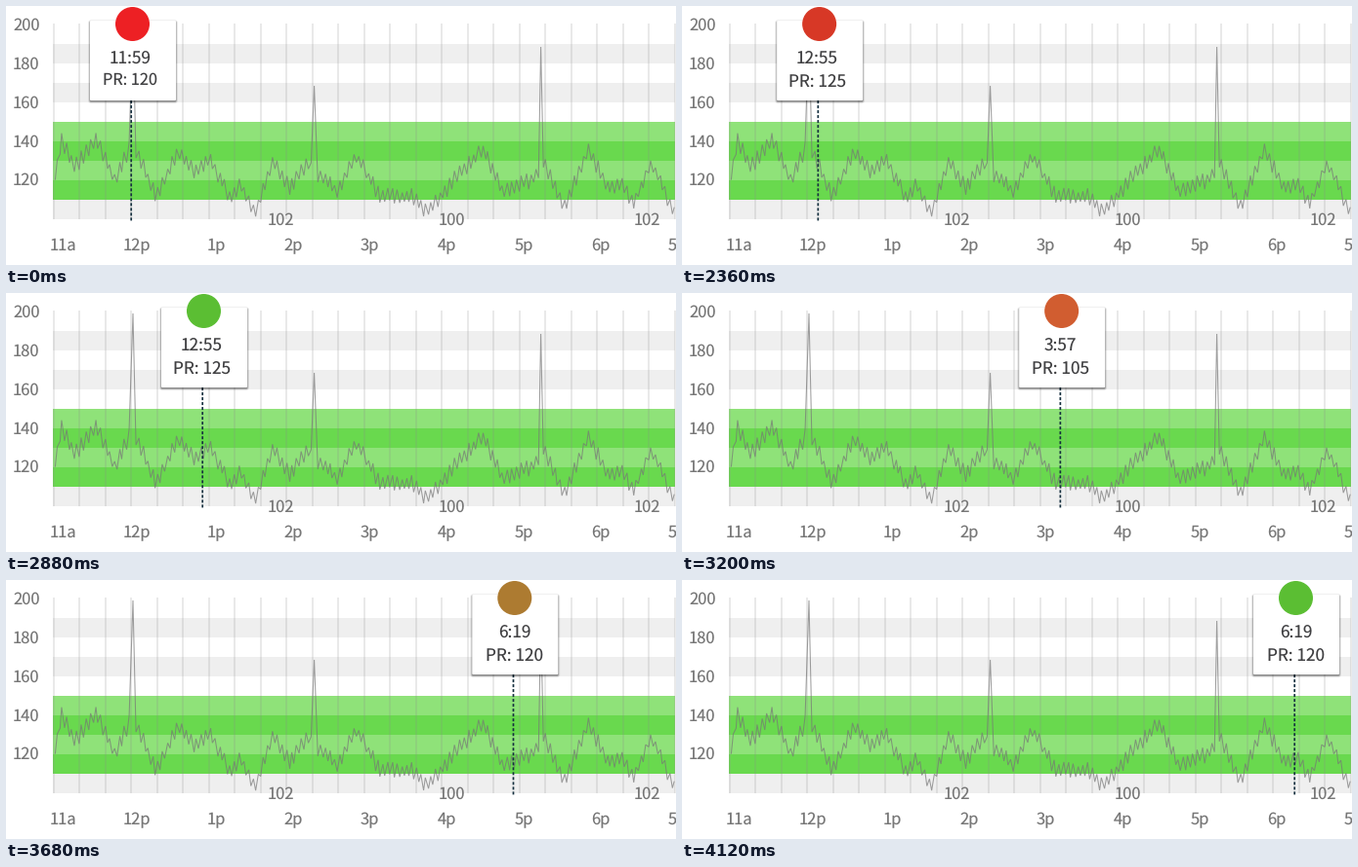
Animation of 686 by 266 pixels, one loop 5600 ms. Source, as a matplotlib script:

```python
import numpy as np
import matplotlib.pyplot as plt
from matplotlib.animation import FuncAnimation
from matplotlib.patches import Circle, FancyBboxPatch, Rectangle
from matplotlib.transforms import Affine2D

W, H, DPI = 686, 266, 100
STEP, LOOP = 40, 5600
PX = 72 / DPI  # points per pixel

plt.rcParams.update({"font.family": "Noto Sans CJK JP", "text.hinting": "none",
                     "toolbar": "None"})

fig = plt.figure(figsize=(W / DPI, H / DPI), dpi=DPI, facecolor="white")
ax = fig.add_axes([0, 0, 1, 1])
ax.set(xlim=(0, W), ylim=(H, 0))
ax.axis("off")


def label(x, y, text, size=16.5, color="#777777", ha="center", **kw):
    return ax.text(x, y, text, fontsize=size * PX, color=color, ha=ha,
                   va="baseline", **kw)


# ---- chart background
GREY, LIGHT, DARK = "#efefef", "#8fe279", "#69d94e"


def band(y, color):
    ax.add_patch(Rectangle((48, y), 637, 20, color=color, lw=0, zorder=1))


for y in (39, 79, 199):
    band(y, GREY)
for y in (119, 159):
    band(y, LIGHT)
    band(y + 20, DARK)

for x in np.linspace(49, 684.5, 25):
    ax.plot([x, x], [18, 219], color="#8c8c8c", alpha=0.25, lw=1.5 * PX,
            solid_capstyle="butt", zorder=2)

for i in range(5):
    label(7, 25 + 39.8 * i, str(200 - 20 * i), ha="left")

label(58, 251, "11a")
label(133.5, 251, "12p")
for hour in range(1, 7):
    label(137 + 78.6 * hour, 251, f"{hour}p")
label(677.5, 251, "5", ha="left")

for x, text in ((281.5, "102"), (456.5, "100"), (656, "102")):
    label(x, 225, text, zorder=4)

# ---- pulse curve: a seeded zigzag around a slow wave, with three spikes
WAVE = [(49, 182), (57, 138), (70, 166), (93, 137), (111, 178), (130, 140),
        (153, 195), (178, 148), (193, 172), (208, 157), (229, 195), (240, 183),
        (255, 214), (274, 159), (290, 187), (309, 163), (339, 190), (358, 153),
        (382, 194), (420, 196), (430, 213), (466, 170), (489, 147), (508, 190),
        (540, 178), (551, 160), (571, 206), (597, 147), (616, 188), (629, 180),
        (642, 204), (661, 161), (686, 216)]
SPIKES = [(130, 21), (315.6, 82), (547.6, 42)]


def pulse_curve():
    rng = np.random.default_rng(4)
    x = np.arange(50, W + 1, 2.45)
    x += rng.uniform(-0.5, 0.5, x.size)
    sign = np.where(np.arange(x.size) % 2, -1, 1)
    y = np.interp(x, *np.transpose(WAVE)) + sign * rng.uniform(3.5, 9, x.size)
    for sx, sy in SPIKES:
        keep = abs(x - sx) > 1.8
        x, y = np.append(x[keep], sx), np.append(y[keep], sy)
    order = np.argsort(x)
    return x[order], y[order]


ax.plot(*pulse_curve(), color="#767676", alpha=0.7, lw=1.05 * PX,
        solid_joinstyle="miter", zorder=3)

# ---- sliding marker, drawn with its card's left edge at x = 0
shift = Affine2D()
moved = shift + ax.transData

ax.plot([42.2, 42.2], [97, 221], color="#16303f", lw=1.7 * PX,
        linestyle=(0, (1.8, 1.15)), dash_capstyle="butt", snap=False,
        transform=moved, zorder=5)


def card(grow, drop, **kw):
    box = FancyBboxPatch((-grow, 15 - grow + drop), 88 + 2 * grow, 82 + 2 * grow,
                         boxstyle=f"round,pad=0,rounding_size={1 + grow}",
                         lw=0, transform=moved, snap=False, **kw)
    ax.add_patch(box)


for grow in (2, 1.4, 0.8, 0.2):
    card(grow, 1.2, color="black", alpha=0.19 - 0.07 * grow, zorder=6)
card(0, 0, color="white", zorder=7)

dot = Circle((43.5, 18.5), 17.5, lw=0, transform=moved, zorder=8)
ax.add_patch(dot)
clock = label(0, 59, "", 17.2, "#404042", transform=moved, zorder=9)
pulse = label(0, 82.5, "", 17.2, "#404042", transform=moved, zorder=9)

RED, GREEN, ORANGE = (np.array(c) / 255 for c in
                      ((237, 32, 36), (91, 190, 51), (238, 69, 47)))
# start time, from x, to x, from colour, to colour
MOVES = [(2280, 86, 159, RED, GREEN),
         (2900, 159, 391, GREEN, ORANGE),
         (3520, 391, 585, ORANGE, GREEN)]
MOVE_TIME = 600
# start time, clock, pulse, text centre, pulse size, pulse baseline
READINGS = [(0, "11:59", 120, 41, 16.3, 81),
            (1720, "12:55", 125, 41.2, 17.2, 82.5),
            (2900, "3:57", 105, 42.4, 17.2, 82.5),
            (3520, "6:19", 120, 43.5, 17.2, 82.5)]


def ease(t):
    """Cubic Bezier (.25, .1, .25, 1)."""
    t = min(max(t, 0), 1)
    s = np.linspace(0, 1, 400)
    along = 0.75 * s * (1 - s) + s ** 3
    eased = 0.3 * s * (1 - s) ** 2 + 3 * (1 - s) * s ** 2 + s ** 3
    return np.interp(t, along, eased)


def update(frame):
    now = frame * STEP
    start, x0, x1, c0, c1 = [m for m in MOVES if m[0] <= max(now, MOVES[0][0])][-1]
    p = ease((now - start) / MOVE_TIME)
    shift.clear().translate(x0 + p * (x1 - x0), 0)
    dot.set_facecolor(tuple(c0 + p * (c1 - c0)))

    _, hour, rate, mid, size, base = [r for r in READINGS if r[0] <= now][-1]
    clock.set_text(hour)
    clock.set_x(mid)
    pulse.set_text(f"PR: {rate}")
    pulse.set_position((mid, base))
    pulse.set_fontsize(size * PX)
    return dot, clock, pulse


anim = FuncAnimation(fig, update, frames=LOOP // STEP, interval=STEP,
                     init_func=lambda: update(0), repeat=True, repeat_delay=0)
plt.show()
```
